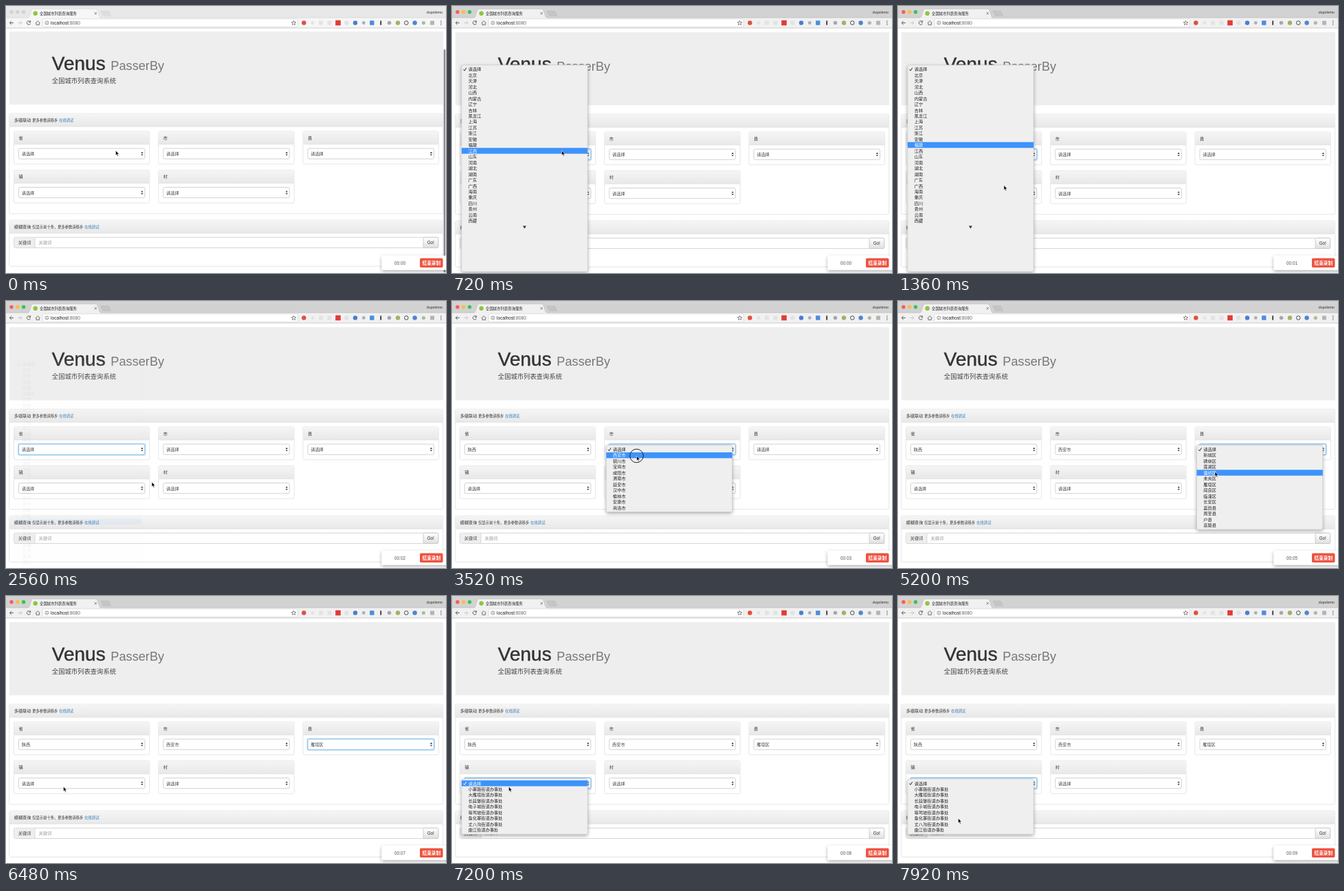
Animation, 640 px wide and 388 px high, one loop 8000 ms. Source, as an HTML page:

```html
<!DOCTYPE html>
<html lang="zh-CN">
<head>
<meta charset="utf-8">
<title>全国城市列表查询服务</title>
<style>
html, body { margin: 0; width: 100%; height: 100%; overflow: hidden; background: #fff; }
svg { display: block; width: 640px; height: 388px; }
text { font-family: "Liberation Sans", "Noto Sans CJK SC", "Noto Sans CJK", sans-serif; white-space: pre; }
</style>
</head>
<body>
<svg viewBox="0 0 640 388" xmlns="http://www.w3.org/2000/svg">
  <defs>
    <linearGradient id="head" x2="0" y2="1"><stop stop-color="#f5f5f5"/><stop offset="1" stop-color="#e8e8e8"/></linearGradient>
    <linearGradient id="button" x2="0" y2="1"><stop stop-color="#fff"/><stop offset="1" stop-color="#e0e0e0"/></linearGradient>
    <filter id="shadow" x="-20%" y="-30%" width="140%" height="160%"><feDropShadow dx="0" dy="2" stdDeviation="2.5" flood-opacity=".35"/></filter>
  </defs>
  <g id="scene"></g>
</svg>
<script>
const LOOP = 8000, ROW = 8.46, LAG = 160;
const PROMPT = '请选择';
const scene = document.getElementById('scene');

// Each menu opens, is clicked, and closes shortly after the click.
const menus = [
  { label: '省', x: 18.5, y: 183, first: 92, open: 640, click: 2160, value: '陕西',
    items: '北京 天津 河北 山西 内蒙古 辽宁 吉林 黑龙江 上海 江苏 浙江 安徽 福建 江西 山东 河南 湖北 湖南 广东 广西 海南 重庆 四川 贵州 云南 西藏 陕西 甘肃 青海 宁夏 新疆 台湾 香港 澳门' },
  { label: '市', x: 228.8, y: 183, first: 215.7, open: 2960, click: 3440, value: '西安市',
    items: '西安市 铜川市 宝鸡市 咸阳市 渭南市 延安市 汉中市 榆林市 安康市 商洛市' },
  { label: '县', x: 439, y: 183, first: 215.7, open: 4480, click: 5560, value: '雁塔区',
    items: '新城区 碑林区 莲湖区 灞桥区 未央区 雁塔区 阎良区 临潼区 长安区 蓝田县 周至县 户县 高陵县' },
  { label: '镇', x: 18.5, y: 239.5, first: 272.2, open: 6880, click: 7720, value: '鱼化寨街道办事处',
    items: '小寨路街道办事处 大雁塔街道办事处 长延堡街道办事处 电子城街道办事处 等驾坡街道办事处 鱼化寨街道办事处 丈八沟街道办事处 曲江街道办事处' },
  { label: '村', x: 228.8, y: 239.5, open: Infinity, click: Infinity, items: '' },
];
for (const menu of menus) {
  menu.items = [PROMPT, ...menu.items.split(' ')];
  menu.close = menu.click + 240;
}
const FULL_LIST_AT = 1440, CLIPPED_ROWS = 27;
const clicks = menus.flatMap(m => [m.open - 120, m.click]);

// Pointer tip: time, x, y
const path = [
  [0, 159.5, 210], [800, 159.5, 210], [1200, 157, 204], [1360, 154, 260.5], [1560, 154, 320],
  [2160, 154, 320], [2400, 165, 310], [2560, 212, 263], [2800, 262, 217], [3200, 264, 218],
  [3400, 268.5, 225], [3680, 268.5, 225], [4240, 461, 217], [4640, 461, 217], [5000, 461, 247],
  [5200, 461, 248], [5440, 461, 267], [5840, 461, 267], [6480, 83.5, 277], [6640, 82, 273],
  [7100, 82, 273], [7680, 87.5, 323], [8000, 87.5, 323],
];

function pointerAt(t) {
  const i = Math.max(1, path.findIndex(key => key[0] >= t));
  const [t0, x0, y0] = path[i - 1], [t1, x1, y1] = path[i];
  const k = Math.min(1, Math.max(0, (t - t0) / (t1 - t0)));
  const e = k * k * (3 - 2 * k);
  return [x0 + (x1 - x0) * e, y0 + (y1 - y0) * e];
}

const rect = (x, y, w, h, fill, extra = '') =>
  `<rect x="${x}" y="${y}" width="${w}" height="${h}" fill="${fill}" ${extra}/>`;
const circle = (x, y, r, fill, extra = '') =>
  `<circle cx="${x}" cy="${y}" r="${r}" fill="${fill}" ${extra}/>`;
const line = (d, color, width = .9) =>
  `<path d="${d}" fill="none" stroke="${color}" stroke-width="${width}"/>`;
const shape = (d, fill, extra = '') => `<path d="${d}" fill="${fill}" ${extra}/>`;
// y is the vertical middle of the glyphs
const text = (x, y, s, size = 6.22, fill = '#333', extra = '') =>
  `<text x="${x}" y="${y + size * .37}" font-size="${size}" fill="${fill}" ${extra}>${s}</text>`;

function browser(active) {
  const bar = active ? '#f2f1f2' : '#f6f6f6';
  const edge = active ? '#b2b2b2' : '#cfcfcf';
  const lights = active ? ['#fc5b57', '#fdbc40', '#34c84a'] : ['#d2d2d2', '#d2d2d2', '#d2d2d2'];
  const faint = '#e3e3e3';
  const square = (x, color, w = 7) => rect(x - w / 2, 24.5 - w / 2, w, w, color, 'rx=".6"');
  const dot = (x, color, r = 3.2) => circle(x, 24.5, r, color);
  const star = Array.from({ length: 10 }, (_, i) => {
    const a = i * Math.PI / 5, r = i % 2 ? 1.5 : 3.5;
    return `${418.5 + r * Math.sin(a)},${24.7 - r * Math.cos(a)}`;
  }).join(' ');
  return rect(0, 0, 640, 17, active ? '#d3d2d3' : '#e8e8e8')
    + lights.map((c, i) => circle(8 + i * 8.8, 8.8, 2.7, c)).join('')
    + rect(0, 17, 640, 15, bar)
    + line('M0 17H640', edge, .6)
    + shape('M32 17.4C35 17 36 4.2 39 4.2H131C134 4.2 135 17 138 17.4Z', bar, `stroke="${edge}" stroke-width=".5"`)
    + rect(32, 17, 106, 1.2, bar)
    + shape('M138 7.3H148.5Q150 7.3 150.5 9L152.5 14.2H142.5Q141 14.2 140.4 12.6Z', active ? '#c6c5c6' : '#dedede', `stroke="${edge}" stroke-width=".5"`)
    + circle(42.7, 10.8, 3.2, '#8cc63e')
    + text(49, 10.6, '全国城市列表查询服务', 5.4, '#222')
    + line('M128.6 9L132 12.4M132 9L128.6 12.4', '#666', .8)
    + text(635, 8.6, 'dupolemo', 5.3, '#333', 'text-anchor="end"')
    + line('M11 24.5H5.4M8 21.8L5.3 24.5L8 27.2', '#555')
    + line('M17.4 24.5H23M20.4 21.8L23.1 24.5L20.4 27.2', '#c4c4c4')
    + line('M35 22.5A2.7 2.7 0 1 0 35.6 25.3M35.6 21.3V23.6H33.2', '#555')
    + line('M43 24.8L46.2 21.6L49.4 24.8M44 24.2V27.4H48.4V24.2', '#555', .8)
    + rect(53.2, 18.7, 371, 11.6, '#fff', 'rx="1.4" stroke="#d0d0d0" stroke-width=".6"')
    + circle(59.4, 24.5, 2.5, 'none', 'stroke="#666" stroke-width=".7"')
    + line('M59.4 24.2V26M59.4 22.8V23.5', '#666', .7)
    + text(65, 24.6, 'localhost<tspan fill="#666">:8080</tspan>', 6.65, '#222')
    + `<polygon points="${star}" fill="none" stroke="#555" stroke-width=".7"/>`
    + dot(433.3, '#e0503d') + dot(446, faint, 2.4) + square(458, faint, 6) + square(470.5, faint, 6)
    + square(483, '#e23b36', 7.6) + dot(495.3, faint) + dot(508, '#4a7fd0') + dot(520.3, '#a9b1b8', 2.4)
    + square(532.3, '#4c8de0', 6.4) + rect(544.2, 21.4, 2, 6.2, '#444') + dot(557.5, '#a3aab0', 2.8)
    + dot(570, '#a8ae6a') + circle(582.3, 24.5, 2.8, 'none', 'stroke="#444" stroke-width="1"')
    + dot(594.6, '#4f86cf') + dot(607.3, '#a8bd9c', 2.6) + square(620, '#b5b5b5', 6)
    + [22, 24.5, 27].map(y => circle(632.8, y, .75, '#555')).join('')
    + line('M0 32H640', '#b9b9b9', .7);
}

const panel = (x, y, w, h) =>
  rect(x, y, w, h, '#fff', 'rx="1.8" stroke="#dcdcdc" stroke-width=".7"')
  + rect(x + .3, y + .3, w - .6, 18.7, 'url(#head)', 'rx="1.5"')
  + line(`M${x} ${y + 19}h${w}`, '#dcdcdc', .6);

const heading = (y, title, note, noteX, linkX) =>
  text(11.7, y, title) + text(noteX, y + .3, note, 5.29)
  + text(linkX, y + .3, '在线调试', 5.29, '#337ab7');

function select(menu, t, focused) {
  const { x, y } = menu, mid = y + 32.7, ax = x + 179.4;
  const value = t >= menu.close + 200 ? menu.value : PROMPT;
  const glow = focused ? rect(x - .8, y + 24.3, 185, 16.8, 'none', 'rx="2.4" stroke="#66afe9" stroke-opacity=".35" stroke-width="1.6"') : '';
  return panel(x - 7, y, 197.3, 47.7) + text(x, y + 9.2, menu.label) + glow
    + rect(x, y + 25, 183.4, 15.2, '#fff', `rx="1.8" stroke="${focused ? '#66afe9' : '#c6c6c6'}" stroke-width=".8"`)
    + text(x + 4.2, mid, value, 6.22, '#444')
    + shape(`M${ax - 1.6} ${mid - .7}h3.2l-1.6 -2.2zM${ax - 1.6} ${mid + .7}h3.2l-1.6 2.2z`, '#333');
}

function page(t) {
  const focused = menus.filter(m => t >= m.open - 80).pop();
  const content = rect(5, 38, 631, 106.3, '#eee')
    + `<text x="66.8" y="94" font-size="28" fill="#333" stroke="#333" stroke-width=".45">Venus</text>`
    + `<text x="152.3" y="94" font-size="18.2" fill="#777">PasserBy</text>`
    + text(66.8, 109.8, '全国城市列表查询系统', 9.33, '#444', 'font-weight="300"')
    + panel(4.7, 157.2, 631, 145.6)
    + heading(167, '多级联动', '更多参数请移步', 38.3, 77.2)
    + menus.map(m => select(m, t, m === focused)).join('')
    + panel(4.7, 312.2, 631, 67)
    + heading(321.4, '模糊查询', '仅显示前十条，更多参数请移步', 38.3, 114.3)
    + rect(11.7, 337.2, 617, 15.2, '#fff', 'rx="1.8" stroke="#c9c9c9" stroke-width=".8"')
    + rect(12, 337.5, 30, 14.6, '#eee', 'rx="1.5"')
    + line('M42 337.2v15.2', '#c9c9c9', .7)
    + text(17.8, 345, '关键词', 6.22, '#444') + text(47.6, 345, '关键词', 6.22, '#999')
    + rect(607, 337.2, 21.7, 15.2, 'url(#button)', 'rx="1.5" stroke="#c4c4c4" stroke-width=".8"')
    + text(617.8, 344.9, 'Go!', 6.3, '#333', 'text-anchor="middle"');
  const scrolled = t < 240;
  return `<g transform="translate(0 ${scrolled ? -1 : 0})">${content}</g>`
    + (scrolled ? rect(636.6, 63, 2.6, 324, '#8a8a8a', 'rx="1.3"') : '');
}

function popup(menu, t) {
  const opacity = t < menu.open ? 0 : Math.min(1, 1 - (t - menu.close) / 170);
  if (opacity <= 0) return '';
  const x = menu.x - 4.5, { first, items } = menu;
  const clipped = menu === menus[0] && t < FULL_LIST_AT;
  const shown = clipped ? items.slice(0, CLIPPED_ROWS) : items;
  const blink = t >= menu.click + 120 && t < menu.close;
  const pointerY = pointerAt(Math.min(t, menu.close) - LAG)[1];
  const hot = blink ? -1 : Math.max(0, Math.floor((pointerY - first) / ROW + .5));
  const ink = i => i === hot ? '#fff' : '#222';
  return `<g opacity="${opacity}">`
    + rect(x, first - 6.2, 183.3, items.length * ROW + 4, '#efefef', 'rx="2.2" stroke="#bbb" stroke-width=".5" filter="url(#shadow)"')
    + (hot >= 0 && hot < shown.length ? rect(x, first + (hot - .5) * ROW, 183.3, ROW, '#3d93fb') : '')
    + shown.map((s, i) => text(x + 9.8, first + i * ROW, s, 6.22, ink(i))).join('')
    + line(`M${x + 2.7} ${first + .2}l1.5 1.9l2.7 -4.3`, ink(0), 1)
    + (clipped ? shape(`M${x + 89} ${first + CLIPPED_ROWS * ROW - .9}h5l-2.5 4z`, '#333') : '')
    + '</g>';
}

function recorder(t) {
  const seconds = Math.max(0, Math.floor(t / 1000 * 1.15 - .08));
  return rect(546.5, 362.8, 100, 20.8, '#fff', 'rx="1" filter="url(#shadow)"')
    + text(573, 373.2, `00:0${seconds}`, 6.4, '#555', 'text-anchor="middle"')
    + rect(602, 366.6, 33.5, 13.4, '#ee5340', 'rx="1.8"')
    + text(618.8, 373.2, '结束录制', 6.65, '#fff', 'text-anchor="middle" font-weight="700"');
}

function pointer(t) {
  const [x, y] = pointerAt(t);
  const pressed = clicks.some(c => t >= c && t < c + 160);
  return `<g transform="translate(${x} ${y})">`
    + (pressed ? circle(0, 0, 9.8, 'none', 'stroke="#222" stroke-width="1"') : '')
    + shape('M0 0V7.1L1.6 5.6L2.7 8.2L3.9 7.7L2.8 5.2H5Z', '#000', 'stroke="#fff" stroke-width=".6"')
    + '</g>';
}

function draw(now) {
  const t = now % LOOP;
  scene.innerHTML = page(t) + browser(t >= 160) + menus.map(m => popup(m, t)).join('')
    + recorder(t) + pointer(t);
  requestAnimationFrame(draw);
}
draw(0);
</script>
</body>
</html>
```
